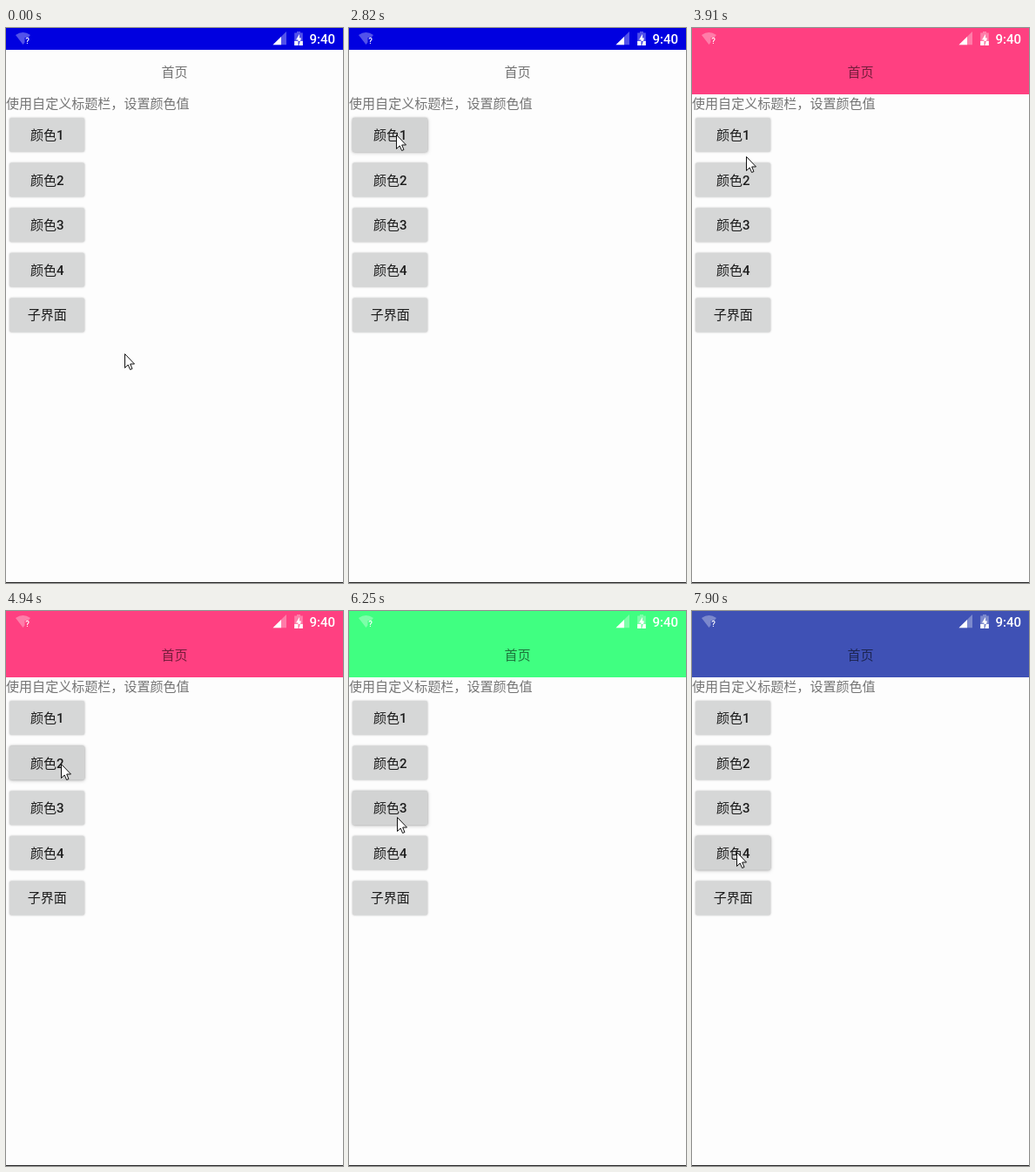
An HTML page that plays this animation: 387x636 px, repeating every 8000 ms.

```html
<!DOCTYPE html>
<html lang="zh-CN">
<head>
<meta charset="utf-8">
<title>首页</title>
<style>
  html, body { margin: 0; width: 100%; height: 100%; overflow: hidden; background: #fdfdfd; }
  svg { display: block; width: 387px; height: 636px; }
  text { font: 400 15.05px Roboto, "Noto Sans CJK SC", "Noto Sans CJK", sans-serif; }
  .soft { fill: rgba(0, 0, 0, .54); }
  .medium { font-weight: 500; }
  .mid { text-anchor: middle; }
  .faint { opacity: .32; }
  .rest { filter: drop-shadow(0 .8px .8px rgba(0, 0, 0, .24)); }
  .lift { filter: drop-shadow(0 1px 2.2px rgba(0, 0, 0, .2)); opacity: 0; }
  .ripple { opacity: 0; }
</style>
</head>
<body>
<svg viewBox="0 0 387 636">
  <rect width="387" height="636" fill="#fdfdfd"/>
  <rect id="header" y="25" width="387" height="51" fill="#fdfdfd"/>
  <rect id="status" width="387" height="25" fill="#0000e0"/>

  <g fill="#fff">
    <path class="faint" d="M11 8Q19.5 2 28 8L25.5 11H21.5V16.5L19.5 19Z"/>
    <text class="medium" x="22.2" y="18" style="font-size:9.6px">?</text>
    <path class="faint" d="M306.5 19.3L322 4V19.3Z"/>
    <path d="M306.5 19.3L316 10V19.3Z"/>
    <path class="faint" d="M331.2 20V5.6H334V4H338V5.6H340.8V20Z"/>
    <path d="M337 7L333 13.6H335.4V20H336.4L339 11.6H337ZM331.2 15H340.8V20H331.2Z"/>
    <text class="medium" x="348.5" y="18">9:40</text>
  </g>

  <text class="soft mid" x="193.5" y="56">首页</text>
  <text class="soft" x="0" y="92">使用自定义标题栏，设置颜色值</text>
  <g id="buttons"></g>
  <rect y="635" width="387" height="1" fill="#252525"/>

  <path id="cursor" d="M.5 .5V16.5L4.2 13L6.6 18.5L9 17.5L6.7 12H11.5Z"
        fill="#fff" stroke="#111" stroke-linejoin="round"/>
</svg>
<script>
const LOOP = 8000, TICK = 125;
const BUTTON_TOP = 103, PITCH = 51.6, HEIGHT = 39;
const byId = id => document.getElementById(id);
const smooth = p => p * p * (3 - 2 * p);

// Holds each value of [ms, value] until the next one, then loops.
function play(el, prop, steps) {
  const frames = steps.map(([ms, value]) =>
    ({ offset: ms / LOOP, [prop]: value, easing: 'step-end' }));
  frames.push({ offset: 1, [prop]: steps.at(-1)[1] });
  el.animate(frames, { duration: LOOP, iterations: Infinity });
}

const showBetween = (el, from, to) =>
  play(el, 'opacity', [[0, 0], [from, 1], ...(to < LOOP ? [[to, 0]] : [])]);

function addButton(label, index) {
  const y = BUTTON_TOP + index * PITCH;
  const box = `x="4" y="${y}" width="86.2" height="${HEIGHT}" rx="2"`;
  const text = label.replace(/\d/, '<tspan class="medium">$&</tspan>');
  const g = document.createElementNS('http://www.w3.org/2000/svg', 'g');
  g.innerHTML = `
    <clipPath id="clip${index}"><rect ${box}/></clipPath>
    <rect class="rest" ${box} fill="#d6d7d7"/>
    <rect class="lift" ${box} fill="#d2d3d3"/>
    <circle class="ripple" cx="62" cy="${y + 20}" r="52"
            fill="#c7c8c7" clip-path="url(#clip${index})"/>
    <text class="mid" x="47.3" y="${Math.round(y + 25.05)}" fill="#1c1c1c">${text}</text>`;
  byId('buttons').append(g);
  return g;
}

const buttons = ['颜色1', '颜色2', '颜色3', '颜色4', '子界面'].map(addButton);

// Each press lifts its button; letting go colours the bars.
const presses = [
  { down: 2820, up: 2970, color: '#ff4081' },
  { down: 4940, up: 5210, color: '#40ff81' },
  { down: 6250, up: 6400, color: '#3f51b5' },
  { down: 7900, up: LOOP }
];
presses.forEach(({ down, up }, i) => showBetween(buttons[i].querySelector('.lift'), down, up));
showBetween(buttons[1].querySelector('.ripple'), presses[1].up, presses[1].up + TICK);

const themes = presses.filter(p => p.color).map(p => [p.up, p.color]);
play(byId('status'), 'fill', [[0, '#0000e0'], ...themes]);
play(byId('header'), 'fill', [[0, '#fdfdfd'], ...themes]);

// The pointer glides between resting places, redrawn once per tick.
const glides = [
  { from: 680, to: 960, x: 136, y: 370 },
  { from: 1110, to: 1350, x: 100, y: 252 },
  { from: 1500, to: 1860, x: 54, y: 122 },
  { from: 3630, to: 3910, x: 62, y: 147 },
  { from: 4060, to: 4420, x: 63, y: 175 },
  { from: 5210, to: 5340, x: 67, y: 186 },
  { from: 5480, to: 5840, x: 55, y: 236 },
  { from: 6400, to: 6760, x: 68, y: 267 },
  { from: 6910, to: 6910, x: 70, y: 281 },
  { from: 7350, to: 7350, x: 51, y: 276 }
];

function pointerSteps(x, y) {
  const at = (px, py) => `translate(${Math.round(px)}px, ${Math.round(py)}px)`;
  const steps = [[0, at(x, y)]];
  for (const g of glides) {
    const gaps = Math.round((g.to - g.from) / TICK);
    for (let k = 0; k <= gaps; k++) {
      const p = smooth((k + 1) / (gaps + 1));
      const ms = g.from + (gaps && (g.to - g.from) * k / gaps);
      steps.push([ms, at(x + (g.x - x) * p, y + (g.y - y) * p)]);
    }
    ({ x, y } = g);
  }
  return steps;
}
play(byId('cursor'), 'transform', pointerSteps(136, 373));
</script>
</body>
</html>
```
